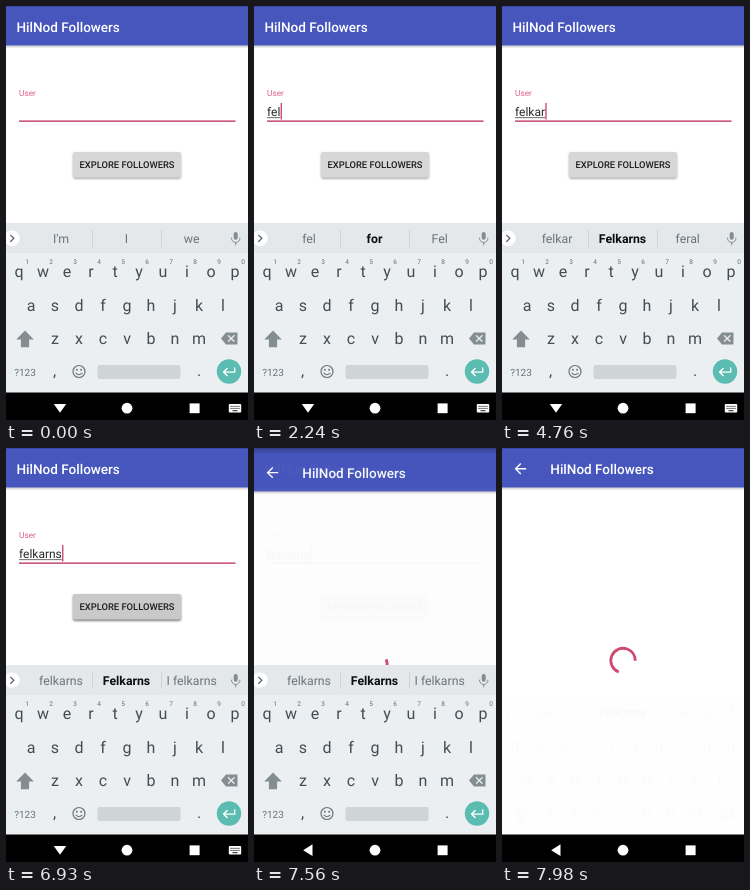
Recreate the animation shown at these times as an HTML page. Size 242x414 px, loop 8 s.

```html
<!DOCTYPE html>
<html lang="en">
<head>
<meta charset="utf-8">
<title>Follower search</title>
<style>
  html, body { margin: 0; width: 100%; height: 100%; overflow: hidden; background: #fff; }
  svg { display: block; width: 242px; height: 414px; }
  text { font-family: Roboto, Arial, sans-serif; text-rendering: geometricPrecision; }
  .mid { text-anchor: middle; }
  .title { font-size: 13.5px; font-weight: 500; fill: #fff; }
  .key { font-size: 16px; fill: #434d53; }
  .num { font-size: 6.5px; fill: #626c72; }
  .word { font-size: 12.3px; fill: #69737a; }
  .strong { font-weight: 700; fill: #0b0d0e; }
  .icon { fill: #838d92; }
  .line { fill: none; stroke-linecap: square; }
</style>
</head>
<body>
<svg viewBox="0 0 242 414">
  <defs>
    <linearGradient id="drop" x2="0" y2="1">
      <stop offset="0" stop-color="#000" stop-opacity=".22"/>
      <stop offset="1" stop-color="#000" stop-opacity="0"/>
    </linearGradient>
    <filter id="soft" x="-10%" y="-30%" width="120%" height="170%">
      <feGaussianBlur stdDeviation="1.1"/>
    </filter>
    <g id="bar">
      <rect width="242" height="39.5" fill="#4656bd"/>
      <rect width="242" height="1" fill="#3a49a8"/>
      <rect y="39.5" width="242" height="3" fill="url(#drop)"/>
    </g>
  </defs>

  <g id="form">
    <rect width="242" height="414" fill="#fff"/>
    <use href="#bar"/>
    <text class="title" x="10.5" y="26">HilNod Followers</text>
    <text x="13" y="90" font-size="8.3" fill="#dc6283">User</text>
    <text id="entry" x="13" y="109.7" font-size="12" fill="#26282a"></text>
    <rect id="compose" x="13" y="111.3" height=".8" fill="#45484a"/>
    <rect id="caret" y="97" width="1.3" height="16.5" fill="#c93f6a"/>
    <rect x="13" y="114.4" width="216.5" height="1.5" fill="#c54a72"/>
    <rect id="lift" x="67" y="147" width="108" height="26" rx="2" filter="url(#soft)"/>
    <rect id="button" x="67" y="146" width="108" height="25.5" rx="2"/>
    <text class="mid" x="121" y="162.2" font-size="9.4" font-weight="500" fill="#1c1c1c">EXPLORE FOLLOWERS</text>
  </g>
  <rect id="dim" width="242" height="414" opacity="0"/>

  <g id="list">
    <rect width="242" height="414" fill="#fff"/>
    <use href="#bar"/>
    <path class="line" d="M23.5 20.7H14M18.3 16l-4.7 4.7 4.7 4.7" stroke="#fff" stroke-width="1.4"/>
    <text class="title" x="48.3" y="26">HilNod Followers</text>
    <circle id="spinner" cx="121" cy="212.5" r="12.2" pathLength="360"
      fill="none" stroke="#cf4a70" stroke-width="2.8"/>
  </g>

  <g id="keyboard">
    <rect y="217" width="242" height="170" fill="#eceff1"/>
    <rect y="217" width="242" height="30" fill="#e4e8ea"/>
    <path d="M86.5 224v17M155.5 224v17" stroke="#cdd3d6"/>
    <circle cx="6" cy="232.3" r="7.7" fill="#fff"/>
    <path class="line" d="M4.8 229.3l3 3-3 3" stroke="#4c565b" stroke-width="1.2"/>
    <g id="words"></g>
    <rect class="icon" x="227.7" y="226" width="4" height="7.8" rx="2"/>
    <path class="line" d="M225.4 232.2a4.3 4.3 0 0 0 8.6 0M229.7 236.6v2.2" stroke="#838d92"/>
    <g id="keys"></g>
    <path class="icon" d="M19 324.6l8.8 9h-4.7v7.6h-8.2v-7.6h-4.7z"/>
    <path class="icon" d="M215 332.5l5-6h11.5v12H220z"/>
    <path class="line" d="M222.5 329.7l5.5 5.5m0-5.5l-5.5 5.5" stroke="#eceff1" stroke-width="1.3"/>
    <text class="mid" x="19" y="369.5" font-size="10" fill="#69737a">?123</text>
    <text class="key mid" x="48.5" y="370">,</text>
    <text class="key mid" x="193" y="370">.</text>
    <circle class="line" cx="73" cy="365.5" r="6" stroke="#6c767c" stroke-width="1.2"/>
    <circle cx="70.9" cy="363.8" r="1" fill="#6c767c"/>
    <circle cx="75.1" cy="363.8" r="1" fill="#6c767c"/>
    <path class="line" d="M70 367.2q3 3.2 6 0" stroke="#6c767c" stroke-width="1.1"/>
    <rect x="91.5" y="359" width="83" height="14" rx="2" fill="#cfd4d6"/>
    <circle cx="223" cy="365.5" r="12.2" fill="#5bbcb2"/>
    <path class="line" d="M228.7 362.3v3.8H218M221 362.7l-3.4 3.4 3.4 3.4" stroke="#fff" stroke-width="1.4"/>
  </g>

  <g fill="#fff">
    <rect y="386.5" width="242" height="27.5" fill="#000"/>
    <g id="navTyping">
      <path d="M47.8 398h12.4L54 406.8z"/>
      <rect x="222.8" y="398" width="12.4" height="8.4" rx="1"/>
      <path d="M224.5 400.3h9M224.5 402.4h9" stroke="#000" stroke-width=".9" stroke-dasharray="1.2 .75"/>
      <path d="M226.5 404.7h5" stroke="#000" stroke-width=".9"/>
    </g>
    <path id="navBack" d="M58.5 396.3v11.8l-9.3-5.9z"/>
    <circle cx="121" cy="402.2" r="5.4"/>
    <rect x="183.6" y="397.4" width="10" height="9.8"/>
  </g>
</svg>

<script>
const LOOP = 8000;
const $ = id => document.getElementById(id);

const typed = [
  [0, ""], [1680, "f"], [1960, "fe"], [2170, "fel"], [2870, "felk"],
  [3150, "felka"], [4550, "felkar"], [4900, "felkarn"], [5110, "felkarns"]
];
const hints = [
  [0, ["I'm", "I", "we"]],
  [1750, ["f", "for", "from"]],
  [2030, ["fe", "few", "feel"]],
  [2240, ["fel", "for", "Fel"]],
  [2940, ["felk", "folk", "Felk"]],
  [3220, ["felka", "Delta", "Felkarns"]],
  [4620, ["felkar", "Felkarns", "feral"]],
  [4970, ["felkarn", "Felkarns", "feral"]],
  [5180, ["felkarns", "Felkarns", "I felkarns"]]
];
const blink = [
  [0, 0], [140, 1], [630, 0], [1260, 1], [2660, 0], [2870, 1], [3640, 0],
  [4130, 1], [5530, 0], [6090, 1], [6580, 0], [6860, 1]
];

const stepAt = (table, t) => table.findLast(([from]) => t >= from)[1];
const ramp = (t, from, to) => Math.min(1, Math.max(0, (t - from) / (to - from)));

function addText(parent, cls, x, y, content = "") {
  const node = document.createElementNS("http://www.w3.org/2000/svg", "text");
  node.setAttribute("class", cls);
  node.setAttribute("x", x);
  node.setAttribute("y", y);
  node.textContent = content;
  return parent.appendChild(node);
}

function set(id, attrs) {
  for (const name in attrs) $(id).setAttribute(name, attrs[name]);
}

[["qwertyuiop", 13, 271], ["asdfghjkl", 25, 304.5], ["zxcvbnm", 49, 338]].forEach(([row, x0, y], r) => {
  [...row].forEach((letter, i) => {
    const x = x0 + i * 24;
    addText($("keys"), "key mid", x, y, letter);
    if (r === 0) addText($("keys"), "num mid", x + 8, 258.3, (i + 1) % 10);
  });
});
const words = [55, 120.5, 185.7].map(x => addText($("words"), "word mid", x, 237));

function draw(t) {
  // Typing
  const entry = $("entry");
  entry.textContent = stepAt(typed, t);
  const width = entry.textContent ? entry.getComputedTextLength() : 0;
  set("compose", { width });
  set("caret", { x: 13.3 + width, opacity: stepAt(blink, t) });
  stepAt(hints, t).forEach((word, i) => words[i].textContent = word);
  words[1].classList.toggle("strong", t >= 1750);

  // Button press
  const press = ramp(t, 6720, 6930) * (1 - ramp(t, 7140, 7350));
  const grey = 215 - 14 * press;
  set("button", { fill: `rgb(${grey},${grey},${grey})` });
  set("lift", { opacity: 0.3 + 0.2 * press });

  // Next screen
  const fade = ramp(t, 7350, 7570);
  const rise = 33 * (1 - ramp(t, 7350, 7700)) ** 2.3;
  set("list", { opacity: fade, transform: `translate(0 ${rise})` });
  set("dim", { opacity: 0.18 * fade });

  const turn = (t - 7560) / 420;
  set("spinner", {
    "stroke-dasharray": `${Math.max(10, 45 + 205 * turn)} 360`,
    transform: `rotate(${-25 + 135 * turn} 121 212.5)`
  });

  // Keyboard leaves
  const leave = ramp(t, 7770, 7985);
  set("keyboard", { opacity: 1 - leave, transform: `translate(0 ${33 * leave})` });
  set("navTyping", { opacity: t < 7490 ? 1 : 0 });
  set("navBack", { opacity: t < 7490 ? 0 : 1 });
}

const start = performance.now();
function tick() {
  draw((performance.now() - start) % LOOP);
  requestAnimationFrame(tick);
}
tick();
</script>
</body>
</html>
```
